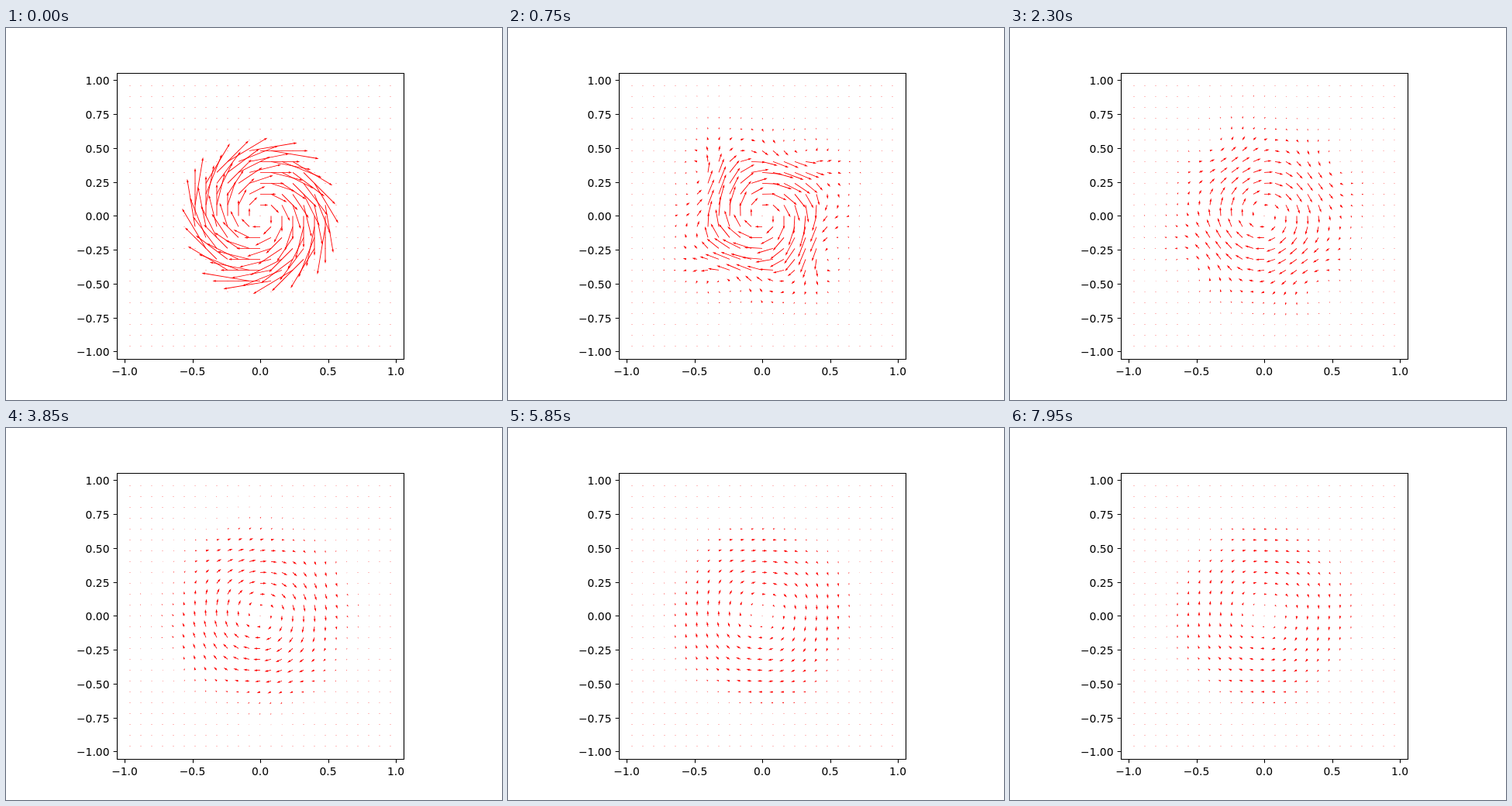
An HTML page with a canvas that plays this animation: 640x480 px, repeating every 8000 ms.

```html
<!DOCTYPE html>
<html lang="en">
<head>
<meta charset="utf-8">
<title>Decaying vortex</title>
<style>
  html, body { margin: 0; width: 100%; height: 100%; overflow: hidden; background: #fff; }
  canvas, svg { position: absolute; left: 0; top: 0; }
  text { font: 13.89px "DejaVu Sans", sans-serif; }
  path { stroke: #000; stroke-width: 1.11; fill: none; }
</style>
</head>
<body>
<canvas id="field" width="640" height="480"></canvas>
<svg id="axes" width="640" height="480"></svg>
<script>
const N = 25, CELL = 2 / N, DT = 0.2, STEPS = 160, STEP_MS = 50;
const SWEEPS = 40;
const UNIT = 175, CX = 328, CY = 242.4, SIDE = 369.6;
const SHAFT = 0.06 * SIDE / N;

const at = (i, j) => j * N + i;
const coord = i => (i - (N - 1) / 2) * CELL;
const clamp = (v, lo, hi) => Math.max(lo, Math.min(hi, v));
const grid = () => new Float64Array(N * N);

function eachCell(visit) {
  for (let j = 0; j < N; j++) for (let i = 0; i < N; i++) visit(i, j, at(i, j));
}

// Rigid clockwise rotation inside a disk of radius 0.5.
function initialField() {
  const u = grid(), v = grid();
  eachCell((i, j, k) => {
    const x = coord(i), y = coord(j);
    if (Math.hypot(x, y) < 0.5) { u[k] = y; v[k] = -x; }
  });
  return { u, v };
}

function sample(f, x, y) {
  x = clamp(x, 0, N - 1.001);
  y = clamp(y, 0, N - 1.001);
  const i = Math.floor(x), j = Math.floor(y), a = x - i, b = y - j;
  return (1 - b) * ((1 - a) * f[at(i, j)] + a * f[at(i + 1, j)])
    + b * ((1 - a) * f[at(i, j + 1)] + a * f[at(i + 1, j + 1)]);
}

function advect({ u, v }) {
  const nu = grid(), nv = grid(), reach = DT / CELL;
  eachCell((i, j, k) => {
    const x = i - u[k] * reach, y = j - v[k] * reach;
    nu[k] = sample(u, x, y);
    nv[k] = sample(v, x, y);
  });
  return { u: nu, v: nv };
}

// Removes divergence with a relaxed pressure solve.
function project({ u, v }) {
  const p = grid(), div = grid();
  const inner = visit => {
    for (let j = 1; j < N - 1; j++) for (let i = 1; i < N - 1; i++) visit(at(i, j));
  };
  inner(k => { div[k] = (u[k + 1] - u[k - 1] + v[k + N] - v[k - N]) / 2; });
  for (let s = 0; s < SWEEPS; s++) {
    inner(k => { p[k] = (p[k + 1] + p[k - 1] + p[k + N] + p[k - N] - div[k]) / 4; });
  }
  inner(k => {
    u[k] -= (p[k + 1] - p[k - 1]) / 2;
    v[k] -= (p[k + N] - p[k - N]) / 2;
  });
  return { u, v };
}

const states = [initialField()];
while (states.length < STEPS) states.push(project(advect(states[states.length - 1])));

const meanSpeed = states[0].u.reduce((sum, u, k) => sum + Math.hypot(u, states[0].v[k]), 0) / (N * N);
const PX_PER_SPEED = SIDE / (1.8 * meanSpeed * N);

const ctx = document.getElementById("field").getContext("2d");

// Outline in shaft widths: a dot, a shrunken arrow or a full arrow.
function outline(len) {
  if (len < 1) {
    return [0, 1, 2, 3, 4, 5].map(n => [Math.cos(n * Math.PI / 3) / 2, Math.sin(n * Math.PI / 3) / 2]);
  }
  const s = Math.min(1, len / 5), neck = len - 4.5 * s, barb = len - 5 * s;
  const half = [[0, s / 2], [neck, s / 2], [barb, 1.5 * s]];
  return [...half, [len, 0], ...half.reverse().map(([x, y]) => [x, -y])];
}

function drawArrow(x, y, u, v) {
  const len = Math.hypot(u, v) * PX_PER_SPEED / SHAFT, angle = Math.atan2(v, u);
  const c = Math.cos(angle) * SHAFT, s = Math.sin(angle) * SHAFT;
  ctx.beginPath();
  for (const [a, b] of outline(len)) ctx.lineTo(x + a * c - b * s, y - a * s - b * c);
  ctx.fill();
}

function render(step) {
  const { u, v } = states[step];
  ctx.clearRect(0, 0, 640, 480);
  ctx.fillStyle = "#f00";
  eachCell((i, j, k) => drawArrow(CX + coord(i) * UNIT, CY - coord(j) * UNIT, u[k], v[k]));
}

function buildAxes() {
  const label = (n, digits) => n.toFixed(digits).replace("-", "\u2212");
  let ticks = "M143.5 58.5H513.5V427.5H143.5Z", texts = "";
  for (let n = -1; n <= 1; n += 0.5) {
    const x = CX + n * UNIT;
    ticks += `M${Math.round(x) + 0.5} 427.5v4.86`;
    texts += `<text x="${x}" y="448" text-anchor="middle">${label(n, 1)}</text>`;
  }
  for (let n = -1; n <= 1; n += 0.25) {
    const y = Math.round(CY - n * UNIT);
    ticks += `M143.5 ${y + 0.5}h-4.86`;
    texts += `<text x="133.5" y="${y + 5.5}" text-anchor="end">${label(n, 2)}</text>`;
  }
  document.getElementById("axes").innerHTML = `<path d="${ticks}"/>${texts}`;
}

function tick() {
  render(Math.floor(performance.now() / STEP_MS) % STEPS);
  requestAnimationFrame(tick);
}

buildAxes();
tick();
</script>
</body>
</html>
```
